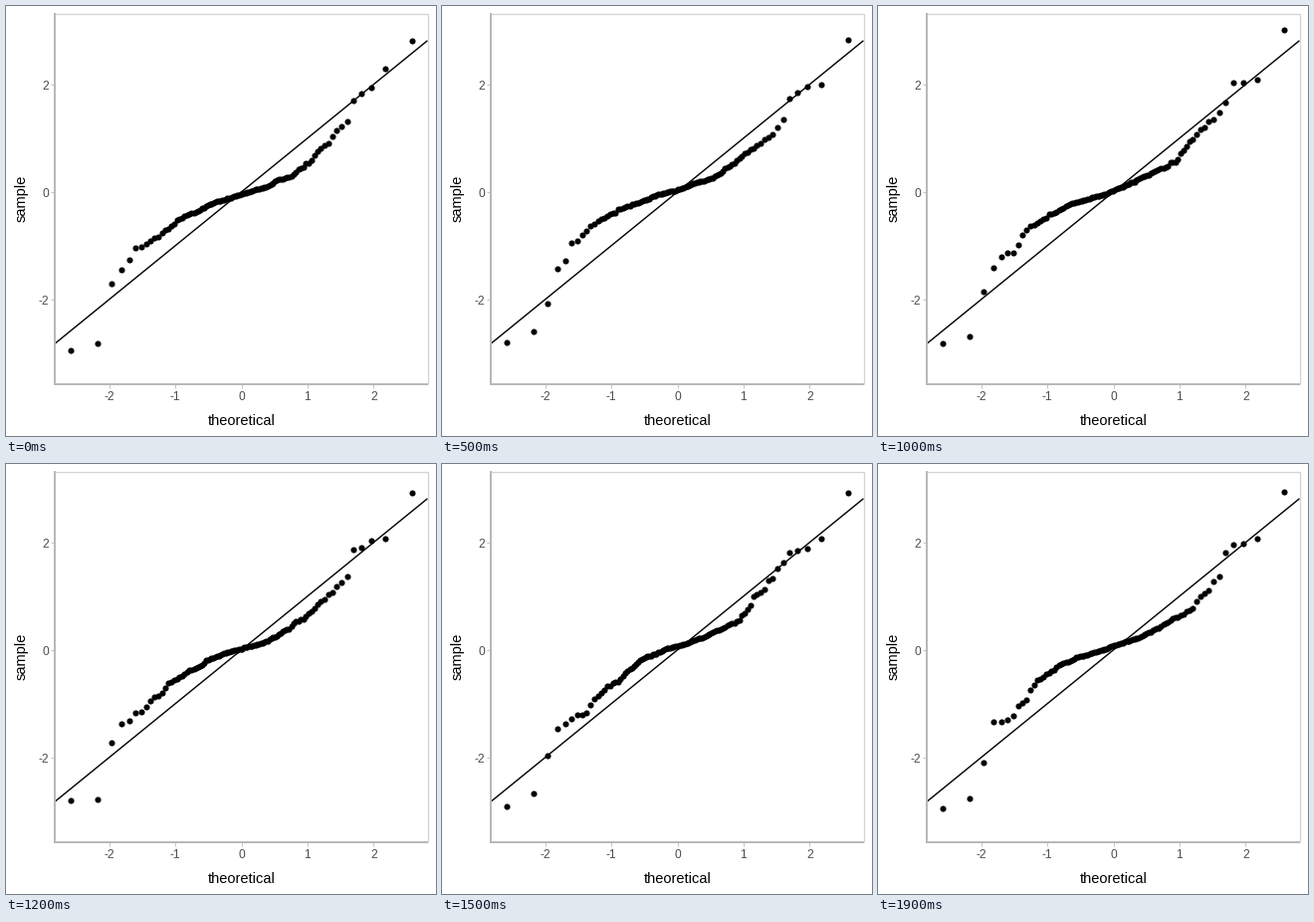
These frames come from a looping animation (432 px wide and 432 px high, 2 s). A matplotlib script:

```python
import math

import matplotlib.pyplot as plt
import numpy as np
from matplotlib.animation import FuncAnimation

SIZE, DPI = 432, 96
FRAMES, STEP = 20, 100
LEFT, RIGHT, TOP, BOTTOM = 49, 423.5, 7.5, 380
COUNT, TAIL = 100, 5
PX = 72 / DPI  # points per pixel

plt.rcParams["font.family"] = "Liberation Sans"


def to_x(v):
    return 236.5 + 66.4 * v


def to_y(v):
    return 186.8 - 54 * v


# Normal quantiles of the evenly spaced probabilities
grid = np.linspace(-4, 4, 4001)
cdf = [0.5 * (1 + math.erf(g / math.sqrt(2))) for g in grid]
theory = np.interp((np.arange(COUNT) + 0.5) / COUNT, cdf, grid)

# Typical ordered sample: a cubic body between two short tails
z = theory[TAIL:-TAIL]
body = (0.04 + 0.4 * z + 0.03 * z**2 + 0.18 * z**3).clip(-1.18)
low_tail = np.array([-2.85, -2.72, -1.9, -1.43, -1.29])
high_tail = np.array([1.79, 1.9, 1.93, 2.04, 2.87])


def sample(step):
    """Fresh ordered sample: uneven gaps in the body, shaken tails."""
    rng = np.random.default_rng(40 + step)
    gaps = np.diff(body) * rng.gamma(3, 1 / 3, len(body) - 1)
    inner = np.concatenate([[0], np.cumsum(gaps)])
    mid = len(body) // 2
    inner += body[mid] - inner[mid] + rng.normal(0, 0.035)
    low = low_tail + rng.normal(0, 0.1, TAIL)
    high = high_tail + rng.normal(0, 0.1, TAIL)
    return np.sort(np.concatenate([low, inner, high]))


fig = plt.figure(figsize=(SIZE / DPI, SIZE / DPI), dpi=DPI, facecolor="white")
ax = fig.add_axes([0, 0, 1, 1])
ax.set_xlim(0, SIZE)
ax.set_ylim(SIZE, 0)
ax.axis("off")


def stroke(xs, ys, color, width, z=1):
    ax.plot(xs, ys, color=color, lw=width * PX, zorder=z,
            solid_capstyle="butt", solid_joinstyle="miter")


def label(x, y, text, size, color, **kw):
    ax.text(x, y, text, fontsize=size, color=color, va="baseline", **kw)


# Identity line, clipped to the panel
ends = np.array([-2.82, 2.816])
stroke(to_x(ends), to_y(ends), "black", 1.42, 2)

# Panel border, axis lines and ticks
stroke([LEFT, RIGHT, RIGHT], [TOP, TOP, BOTTOM], "#d4d4d4", 1.3, 4)
stroke([LEFT, LEFT, RIGHT + 0.5], [TOP - 0.5, BOTTOM, BOTTOM], "#b8b8b8", 2, 5)
for v in range(-2, 3):
    x = to_x(v)
    stroke([x, x], [BOTTOM, BOTTOM + 4], "#c4c4c4", 1)
    label(x, 396.5, str(v), 9, "#4d4d4d", ha="center")
for v in (-2, 0, 2):
    y = to_y(v)
    stroke([LEFT - 4, LEFT], [y, y], "#c4c4c4", 1)
    label(43, y + 5, str(v), 9, "#4d4d4d", ha="right")

label(237, 421, "theoretical", 11, "black", ha="center")
label(19.5, 193.5, "sample", 11, "black", ha="center",
      rotation=90, rotation_mode="anchor")

dots, = ax.plot([], [], "o", color="black", ms=6.1 * PX, mew=0, zorder=3)


def draw(step):
    dots.set_data(to_x(theory), to_y(sample(step)))
    return dots,


anim = FuncAnimation(fig, draw, frames=FRAMES, interval=STEP,
                     init_func=lambda: draw(0), repeat=True, repeat_delay=0)
plt.show()
```
